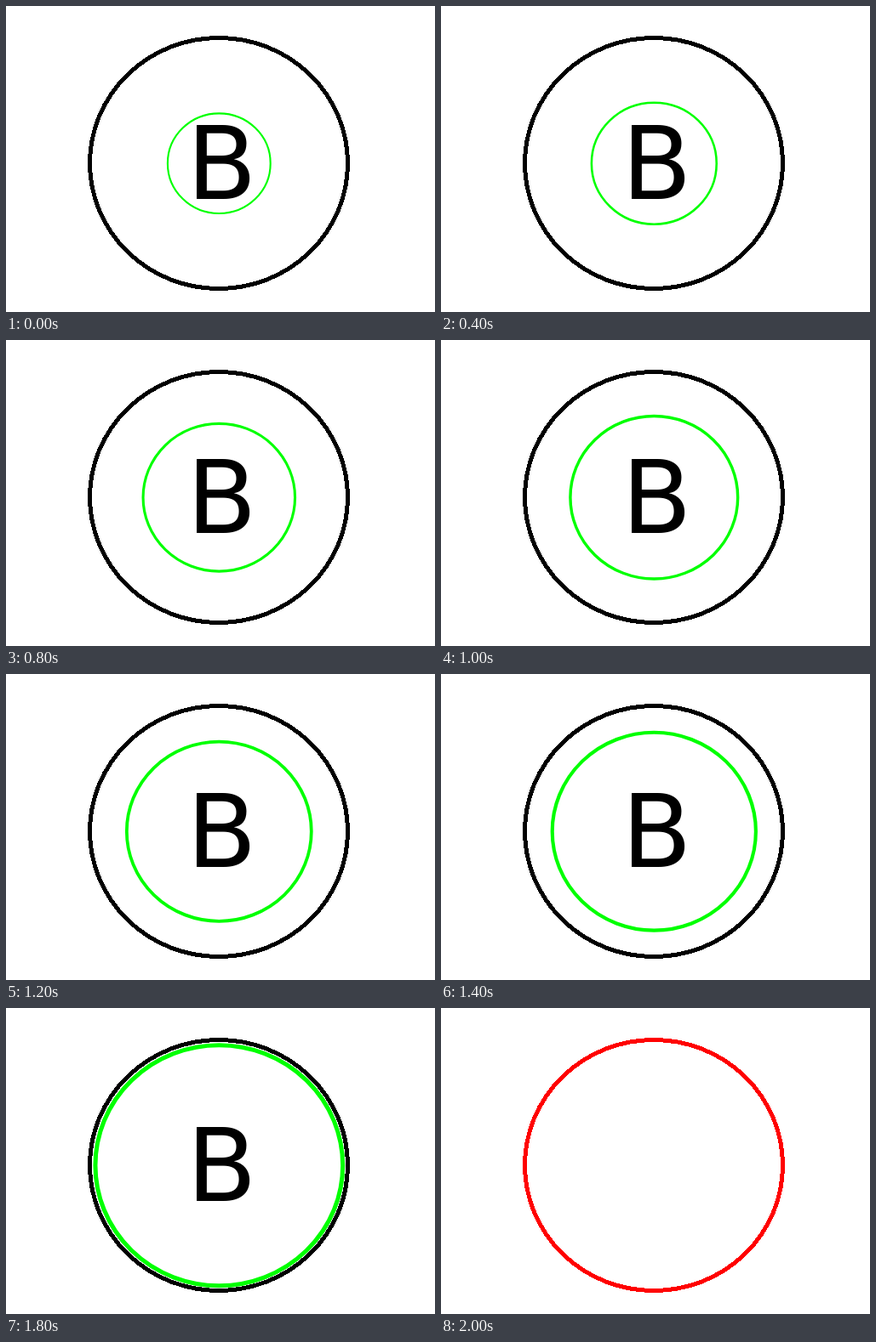
These frames come from a looping animation (504x360 px, 2500 ms). An HTML page:

```html
<!DOCTYPE html>
<html lang="en">
<head>
<meta charset="utf-8">
<title>Growing ring</title>
<style>
  html, body { margin: 0; width: 100%; height: 100%; overflow: hidden; background: #fff; }
  svg { display: block; }
  ellipse { fill: none; }
  text { font: 120px "DejaVu Sans", sans-serif; }
</style>
</head>
<body>
<svg width="504" height="360" viewBox="0 0 504 360">
  <ellipse id="rim" cx="250" cy="185" rx="151.5" ry="147.5" stroke-width="5" shape-rendering="crispEdges"/>
  <text id="letter" x="212.2" y="227">B</text>
  <ellipse id="ring" cx="250.3" cy="185.2" stroke="#0f0"/>
</svg>
<script>
const rim = document.getElementById('rim');
const ring = document.getElementById('ring');
const letter = document.getElementById('letter');
const STEP = 100, LOOP = 2500, REACHED = 19;
const start = performance.now();

function draw(now) {
  const step = Math.floor((Math.max(0, now - start) % LOOP) / STEP);
  const done = step > REACHED;
  const touching = step === REACHED;

  // The ring grows 5% per step, then lands on the rim.
  const scale = 1.05 ** step;
  ring.setAttribute('rx', 60.4 * scale);
  ring.setAttribute('ry', 58.8 * scale);
  ring.setAttribute('stroke-width', 2.1 * scale);
  ring.style.filter = step ? `blur(${0.3 * (scale - 1)}px)` : 'none';
  ring.style.display = done || touching ? 'none' : '';

  rim.setAttribute('stroke', done ? '#f00' : touching ? '#0f0' : '#000');
  letter.style.display = done ? 'none' : '';
  requestAnimationFrame(draw);
}
draw(start);
</script>
</body>
</html>
```
